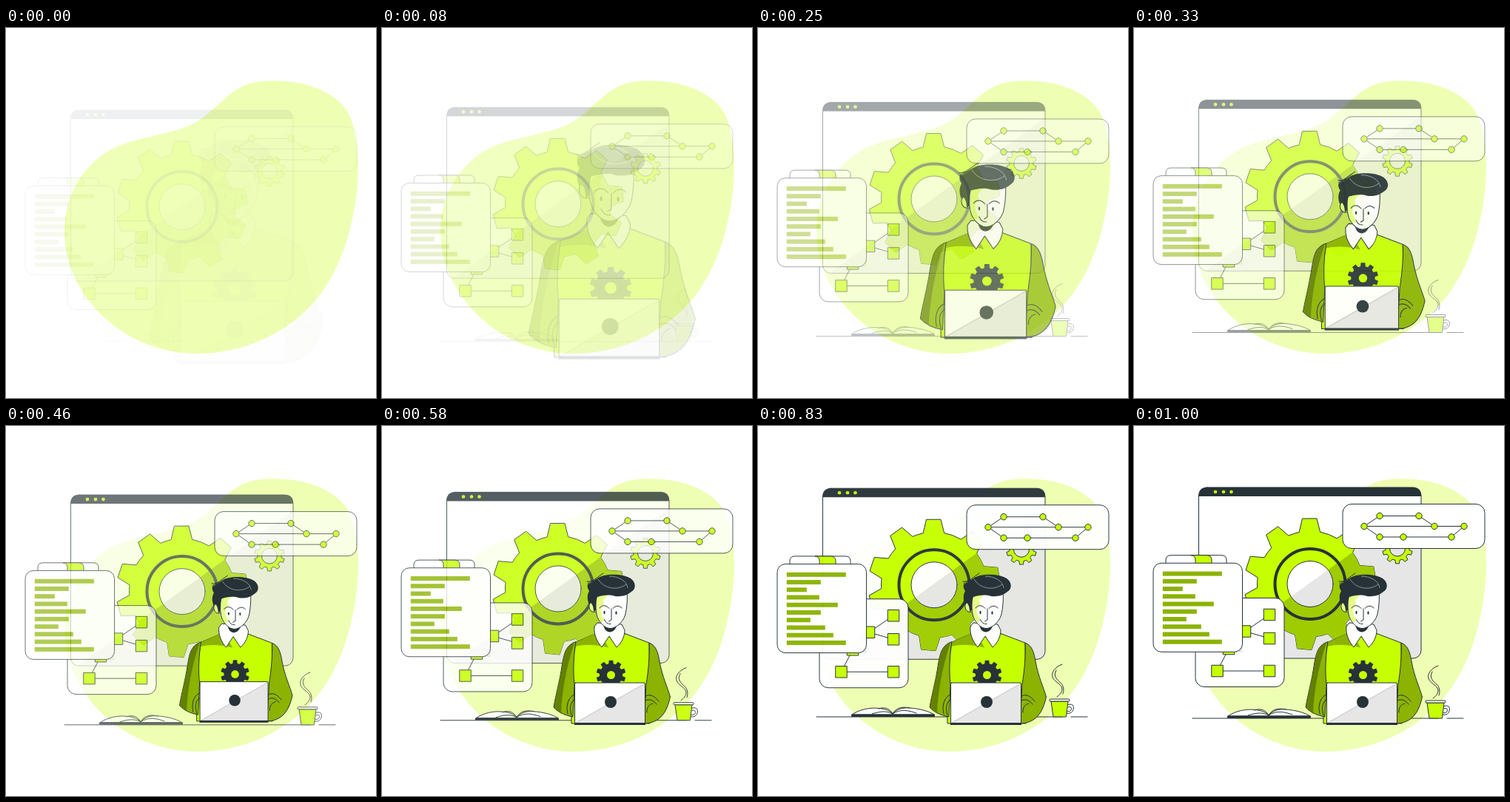
Write an HTML page that moves like this. It is 500 by 500 pixels and loops after 1.04 s.

```html
<!DOCTYPE html>
<html lang="en">
<head>
<meta charset="utf-8">
<title>Developer at work</title>
<style>
  html, body { margin: 0; width: 100%; height: 100%; overflow: hidden; background: #fff; }
  svg { display: block; width: 100%; height: 100%; }
  .line { fill: none; stroke: #263238; stroke-width: 1; stroke-linecap: round; stroke-linejoin: round; }
  .lime { fill: #c6ff00; }
  .olive { fill: #8bb300; }
  .dark { fill: #263238; }
  .white { fill: #fff; }
  .grey { fill: #e6e6e6; }
  .edge { stroke: #263238; stroke-width: 1; stroke-linejoin: round; }
  .zoom { transform-origin: 310.5px 302px; }
</style>
</head>
<body>
<svg viewBox="0 0 500 500">
  <defs>
    <clipPath id="shade"><path d="M96 314L388 104V314Z"/></clipPath>
    <clipPath id="besideDocument"><path d="M146.500 226H210V360H76V305.500H146.500Z"/></clipPath>
  </defs>

  <path fill="#eeffb3" d="M345 72C395 68 440 82 461 112C476 138 477 180 475.500 205C471 268 452 332 412 375C373 416 318 440 258 440C160 440 79 362 79 275C79 225 105 186 140 165C175 147 213 147 252 130C288 111 302 76 345 72Z"/>

  <!-- browser window with gears -->
  <g class="rise">
    <rect class="white" x="87.500" y="83" width="300.500" height="231" rx="11"/>
    <path class="grey" d="M96 314L388 104V303Q388 314 377 314Z"/>
    <path class="dark" d="M87.500 95V94Q87.500 83 98.500 83H377Q388 83 388 94V95Z"/>
    <rect class="line" x="87.500" y="83" width="300.500" height="231" rx="11"/>
    <g class="lime">
      <circle cx="110" cy="89" r="2.300"/>
      <circle cx="121" cy="89" r="2.300"/>
      <circle cx="131.500" cy="89" r="2.300"/>
    </g>
    <path id="bigGear" class="lime edge"/>
    <path id="bigGearShade" fill="#9ecc00" clip-path="url(#shade)"/>
    <circle cx="238" cy="213.500" r="47.500" fill="none" stroke="#263238" stroke-width="4"/>
    <circle class="white" cx="238" cy="213.500" r="31"/>
    <circle class="grey" cx="238" cy="213.500" r="31" clip-path="url(#shade)"/>
    <circle class="line" cx="238" cy="213.500" r="31"/>
    <path id="smallGear" class="lime edge"/>
    <circle class="grey edge" cx="356" cy="165.500" r="10.500"/>
  </g>

  <!-- network panel -->
  <g class="rise">
    <rect class="white edge" x="282" y="105.500" width="192" height="60" rx="12"/>
    <path class="line" d="M311 135.500L332 121.500H385L406 135.500M311 135.500H446L429 150H332L311 135.500"/>
    <g id="nodes" class="lime edge"></g>
  </g>

  <!-- flow chart panel -->
  <g class="rise">
    <g clip-path="url(#besideDocument)">
      <rect class="white edge" x="83" y="232.500" width="120" height="120" rx="12"/>
      <path class="line" d="M183 255L150 277.500L183 287M150 277.500L128 301L112.500 331H183"/>
      <g id="boxes" class="lime edge"></g>
    </g>
  </g>

  <!-- document panel -->
  <g class="rise">
    <path class="white edge" d="M43 188V181Q43 174.700 50 174.700H118Q125 174.700 125 181V188Z"/>
    <path class="lime edge" d="M77 174.700H98Q105 174.700 105 181V187H83V181Q83 175 77 174.700Z"/>
    <rect class="white edge" x="26" y="185.300" width="120.500" height="120" rx="11"/>
    <g id="bars" class="olive"></g>
  </g>

  <!-- desk, book and cup -->
  <g class="lift">
    <path class="line" d="M79 395H411M423 395H445"/>
    <path class="white edge" d="M127 392C137 385 152 382 163 383.500C172 384 178 387 182 390.500C188 385 195 382 205 383C218 384 230 387 238 392Z"/>
    <path class="line" d="M182 391C173 386 164 388 154 391M182 391C178 384 172 381 163 384M182 391C187 382 195 381 205 383M182 391C192 384 203 386 214 390"/>
    <rect class="dark" x="126" y="391.500" width="113" height="3.500" rx="1"/>
    <path class="line" d="M418 379C424 376 428 380 426 385C425 390 420 391 416 390M419 382C423 380 424 383 423 386C422 388 419 388 417 387"/>
    <path class="lime edge" d="M396 374H419L416.500 395H399Z"/>
    <rect class="white edge" x="394" y="371" width="27" height="3" rx="1"/>
    <path class="line" d="M411 324C402 327 396 335 398 341C400 348 410 350 411 357C411 362 408 365 404 368M403 332C398 341 405 345 409 349C413 353 414 359 412 364"/>
  </g>

  <!-- man with laptop -->
  <g class="zoom">
    <path class="lime edge" d="M290 280L262 292C257 320 255 345 256 402H362L361 293L327 280Z"/>
    <path class="olive" d="M288 280.500L261 292.500L260 298Q282 293 306 299.500L293 276Z"/>
    <path class="olive edge" d="M262 291.500C248 296 246 308 243.500 322C240 346 235 362 232 380C238 387 247 391 258 393L260 350C258 330 259 310 262 291.500Z"/>
    <path fill="#638000" d="M260 293C248 297 246 309 244 322C240 346 235 362 232.500 380C235 383 238 385 242 387C243 360 249 325 260 293Z"/>
    <path class="olive edge" d="M361 293C370 296 373 306 375 318C379 340 386 353 389.500 366C386 382 380 395 366 400C360 402 357 402 354 401L357 350C360 330 362 310 361 293Z"/>
    <path class="line" d="M262 362C252 365 248 377 251 389M261 369C254 373 253 381 256 391M356 365C363 361 369 366 374 372M356 371C362 368 367 371 371 376M358 387C357 381 361 376 366 375"/>
    <path id="badge" class="dark"/>
    <circle class="lime" cx="309.500" cy="336.500" r="5.500"/>

    <path class="white edge" d="M291 266L287 271C286 281 290 291 297 299L307 284L317 299C324 293 328 284 328 276L324 268Z"/>
    <path class="dark" d="M299 268C301 282 314 282 318 268Z"/>
    <path fill="#e5ff85" class="edge" d="M290 239C284 235 279 239 280 245C281 251 286 253 291 250Z"/>
    <path class="white edge" d="M288 224C289 240 288 254 293 262C298 270 303 273.500 309 273.500C316 273 325 266 328.500 256C331 247 332 232 331 222Z"/>
    <path fill="#e5ff85" d="M289 227H309C302 230 297 235 300 241C294 246 295 255 301 262L296 266C290 257 289 243 289 227Z"/>
    <path class="dark" d="M278 214C283 212 287 209 291 206C300 199 325 199 336 206C343 211 344 220 337 224C331 229 324 231 315 230C306 227 298 229 291 231C289 236 290 242 289 249L286 251C286 242 282 236 280 241C277 235 277 228 280 223C278 220 277 217 278 214Z"/>
    <path class="line" d="M277 210C284 212 291 204 299 199M278 213L293 206M327 229C330 226 331 222 330 220"/>
    <path d="M292 207C300 220 318 223 330 214M307 203C319 203 331 209 332 219" fill="none" stroke="#b7bbbd" stroke-width=".7"/>
    <path class="line" d="M294 246C297 241.500 303 241.500 307 246.500M312 246.500C316 242 321 242.500 324 246"/>
    <path class="line" d="M310 247V262L306.500 264M300.500 261.500C302 265.500 305 268 309 267.500"/>
    <g class="dark">
      <ellipse cx="300.500" cy="252" rx="1.100" ry="2.200"/>
      <ellipse cx="316.500" cy="252.500" rx="1.100" ry="2.200"/>
    </g>

    <rect class="white" x="260.500" y="347" width="95" height="55"/>
    <path class="grey" d="M261 401.500L355 348V401.500Z"/>
    <path class="line" d="M261 401.500L355 348" opacity=".25"/>
    <rect class="line" x="260.500" y="347" width="95" height="55" rx="1"/>
    <circle class="dark" cx="309" cy="373" r="8"/>
    <rect class="dark" x="260" y="401" width="96" height="3"/>
  </g>
</svg>

<script>
const $ = id => document.getElementById(id);
const evenly = n => Array.from({ length: n }, (_, i) => i * 360 / n);

// Outline of a gear: one trapezoid tooth per angle, joined by arcs on the root circle.
function gear(cx, cy, root, tip, angles, baseHalf, tipHalf) {
  const at = (r, deg) => {
    const a = deg * Math.PI / 180;
    return (cx + r * Math.sin(a)).toFixed(2) + ' ' + (cy - r * Math.cos(a)).toFixed(2);
  };
  return angles.map((a, i) =>
    (i ? `A${root} ${root} 0 0 1 ` : 'M') + at(root, a - baseHalf) +
    'L' + at(tip, a - tipHalf) + 'L' + at(tip, a + tipHalf) + 'L' + at(root, a + baseHalf)
  ).join('') + `A${root} ${root} 0 0 1 ${at(root, angles[0] - baseHalf)}Z`;
}

const big = gear(238, 213.5, 71.5, 89, [-0.5, 42, 81, 112.7, 149, 185, 222, 254.5, 288.5, 324.5], 11.5, 6.3);
$('bigGear').setAttribute('d', big);
$('bigGearShade').setAttribute('d', big);
$('smallGear').setAttribute('d', gear(356, 165.5, 16, 20.5, evenly(10), 11, 7));
$('badge').setAttribute('d', gear(309.5, 336.5, 15.5, 20, evenly(10), 12, 8));

$('nodes').innerHTML = [[332, 121.5], [385, 121.5], [311, 135.5], [406, 135.5], [446, 135.5],
  [332, 150], [364, 150], [429, 150]]
  .map(([x, y]) => `<circle cx="${x}" cy="${y}" r="4.2"/>`).join('');

$('boxes').innerHTML = [[183, 255], [183, 287], [150, 277.5], [128, 301], [112.5, 331], [183, 331]]
  .map(([x, y]) => `<rect x="${x - 7.75}" y="${y - 7.75}" width="15.5" height="15.5"/>`).join('');

$('bars').innerHTML = [80, 46, 27, 44, 69, 46, 32, 52, 63, 80]
  .map((w, i) => `<rect x="38.8" y="${196.6 + i * 10.23}" width="${w}" height="6"/>`).join('');

function bezier(x1, y1, x2, y2) {
  const point = (a, b, s) => 3 * a * s * (1 - s) ** 2 + 3 * b * s * s * (1 - s) + s ** 3;
  return x => {
    if (x >= 1) return 1;
    let lo = 0, hi = 1;
    for (let i = 0; i < 24; i++) {
      const mid = (lo + hi) / 2;
      if (point(x1, x2, mid) < x) lo = mid; else hi = mid;
    }
    return point(y1, y2, lo);
  };
}

const easeOut = bezier(0, 0, .58, 1);
const overshoot = bezier(.36, -.01, .5, 1.38);
const slide = p => `translateY(${30 * (1 - p)}px)`;
const shrink = p => `scale(${1.5 - .5 * p})`;

const LOOP = 1040, STEPS = 25;
const tracks = [
  ['.rise', 1, easeOut, slide],
  ['.lift', 1, overshoot, slide],
  ['.zoom', .6, overshoot, shrink],
].map(([name, ...rest]) => [document.querySelectorAll(name), ...rest]);

// Poses are held for one step each; the small lead absorbs rounded step times.
function draw() {
  const step = Math.min(STEPS - 1, Math.floor((performance.now() % LOOP + 4) * STEPS / LOOP));
  const t = (step + 1) / STEPS;
  for (const [parts, length, ease, pose] of tracks) {
    const p = ease(t / length);
    for (const part of parts) {
      part.style.opacity = Math.max(0, Math.min(1, p));
      part.style.transform = pose(p);
    }
  }
  requestAnimationFrame(draw);
}
draw();
</script>
</body>
</html>
```
